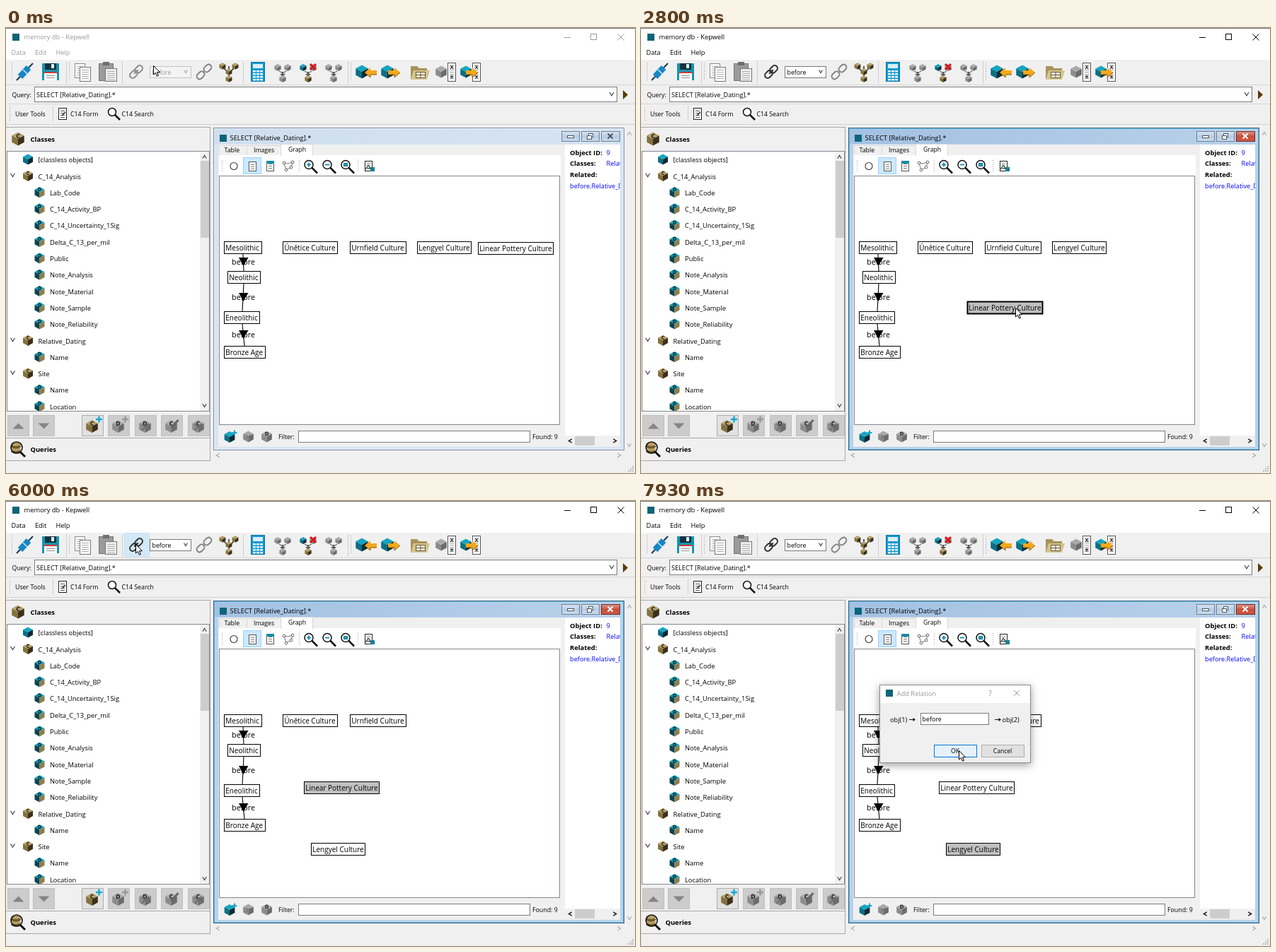
An HTML page with a canvas that plays this animation: 889x630 px, repeating every 8 s.

```html
<!DOCTYPE html>
<html lang="en">
<head>
<meta charset="utf-8">
<title>Relation editor</title>
<style>
html, body { margin: 0; width: 100%; height: 100%; overflow: hidden; background: #f0f0f0; }
canvas { display: block; }
</style>
</head>
<body>
<canvas id="stage" width="889" height="630"></canvas>
<script>
const c = document.getElementById('stage').getContext('2d');
const LOOP = 8000, STEP = 200 / 3, TAU = Math.PI * 2;
const FACE = '#f0f0f0', TEAL = ['#16a5bf', '#0b6f85', '#0a2b36'], TAN = ['#b5a06a', '#85713f', '#3b3018'];
const ATTR = ['#14a0b8', '#0b4450', '#8f7d4c'], GREY = ['#aaa', '#8c8c8c', '#6c6c6c'];

// ---- drawing helpers ----
function text(s, x, y, size = 9.4, col = '#000', bold = false, align = 'left') {
  c.font = (bold ? 'bold ' : '') + size + 'px "Open Sans", "Noto Sans", sans-serif';
  c.textAlign = align;
  c.fillStyle = col;
  c.fillText(s, x, y + size * 0.37);
}
function rect(x, y, w, h, col) { c.fillStyle = col; c.fillRect(x, y, w, h); }
function box(x, y, w, h, fill, edge, lw = 1) {
  rect(x, y, w, h, fill);
  c.strokeStyle = edge; c.lineWidth = lw;
  c.strokeRect(x + 0.5, y + 0.5, w - 1, h - 1);
}
function path(p) {
  c.beginPath();
  for (let i = 0; i < p.length; i += 2) c.lineTo(p[i], p[i + 1]);
}
function poly(p, fill) { path(p); c.fillStyle = fill; c.fill(); }
function line(p, col, w = 1) { path(p); c.strokeStyle = col; c.lineWidth = w; c.stroke(); }
function ring(x, y, r, col, w = 1, fill) {
  c.beginPath(); c.arc(x, y, r, 0, TAU);
  if (fill) { c.fillStyle = fill; c.fill(); }
  c.strokeStyle = col; c.lineWidth = w; c.stroke();
}
function clipped(x, y, w, h, draw) {
  c.save(); c.beginPath(); c.rect(x, y, w, h); c.clip(); draw(); c.restore();
}
function cube(x, y, r, [top, left, right], letter) {
  const w = r * 0.92, h = r / 2;
  poly([x, y - r, x + w, y - h, x, y, x - w, y - h], top);
  poly([x - w, y - h, x, y, x, y + r, x - w, y + h], left);
  poly([x + w, y - h, x, y, x, y + r, x + w, y + h], right);
  if (letter) text(letter, x, y - h, r * 0.95, '#111', true, 'center');
}
function chevron(x, y, dx, dy, col = '#444', w = 1.2) {
  line([x - dx - dy, y - dy + dx, x + dx * 0.6, y + dy * 0.6, x - dx + dy, y - dy - dx], col, w);
}
function handle(x, y, n) { for (let i = 0; i < n; i++) rect(x, y + i * 3, 1, 1, '#9a9a9a'); }
function cross(x, y, r, col, w = 1) {
  line([x - r, y - r, x + r, y + r], col, w);
  line([x - r, y + r, x + r, y - r], col, w);
}
function plus(x, y, r, col, w) {
  line([x - r, y, x + r, y], col, w);
  line([x, y - r, x, y + r], col, w);
}
function page(x, y, w, h, edge, rule, fill = '#fff') {
  box(x, y, w, h, fill, edge);
  for (let j = y + 4; j < y + h - 2; j += 3) line([x + 3, j + 0.5, x + w - 3, j + 0.5], rule);
}
function lens(x, y, r, sign) {
  line([x + r * 0.7, y + r * 0.7, x + r * 2, y + r * 2], '#111', 2.6);
  ring(x, y, r, '#111', 1.5, '#fff');
  if (sign) line([x - 3, y, x + 3, y], '#0a8ea8', 1.8);
  if (sign === '+') line([x, y - 3, x, y + 3], '#0a8ea8', 1.8);
}
function fatArrow(x, y, d, col) {
  poly([x - 9 * d, y - 3, x, y - 3, x, y - 7, x + 8 * d, y, x, y + 7, x, y + 3, x - 9 * d, y + 3], col);
  line([x - 9 * d, y + 3, x, y + 3, x, y + 7, x + 8 * d, y], '#8a5a00');
}
function thinArrow(x, y) {
  line([x, y, x + 8, y], '#111');
  poly([x + 9, y, x + 5.5, y - 2.5, x + 5.5, y + 2.5], '#111');
}
function chain(x, y, col, gap) {
  c.save();
  c.translate(x, y); c.rotate(-Math.PI / 4);
  c.strokeStyle = col; c.lineWidth = 2;
  for (const s of [-1, 1]) {
    c.beginPath(); c.roundRect(s * gap - 6, -4, 12, 8, 4); c.stroke();
  }
  if (gap < 6) line([-4, 0, 4, 0], col, 2);
  c.restore();
}

// ---- toolbars ----
function merge(x, pal, del) {
  cube(x - 7, 56, 5, pal);
  cube(x + 7, 56, 5, del ? GREY : pal);
  line([x - 5, 61, x, 64, x + 5, 61], '#666', 1.2);
  line([x, 62, x, 66], '#555', 2);
  poly([x - 4, 65, x + 4, 65, x, 69], '#555');
  cube(x, 72, 5, del ? TAN : pal);
  if (del) cross(x + 7, 55, 4, '#d81818', 3);
}
function sheet(x) {
  page(x, 49, 12, 27, '#555', '#999');
  text('X', x + 6, 55, 7, '#222', true, 'center');
  text('x', x + 6, 68, 7, '#222', true, 'center');
}
function mainBar(linkable, hover) {
  handle(8, 49, 9);
  line([15, 74, 38, 50], '#123b52', 2);
  line([20, 69, 32, 56], '#1787c4', 9);
  line([24, 59, 30, 65], '#cfeefa', 1.5);

  rect(51, 50, 24, 24, '#1595b0');
  rect(55, 50, 16, 9, '#123440');
  rect(64, 51, 4, 6, '#dff4f8');
  rect(54, 62, 18, 12, '#fff');
  rect(54, 62, 18, 2, '#d33a32');
  for (const y of [67, 70]) rect(57, y, 12, 1, '#888');

  rect(85, 47, 1, 32, '#cfcfcf');
  handle(89, 49, 9);
  page(97, 50, 15, 21, '#8a8a8a', '#b5b5b5');
  page(104, 55, 16, 21, '#777', '#aaa');
  box(131, 50, 21, 25, '#9b9b9b', '#747474');
  rect(137, 48, 9, 5, '#6e6e6e');
  page(140, 57, 17, 19, '#777', '#b0b0b0', '#eee');
  rect(164, 47, 1, 32, '#cfcfcf');

  if (hover) box(167, 45, 36, 34, '#d4e9f7', '#c3dff2');
  chain(184, 62, linkable ? '#333' : '#8d8d8d', 5);
  box(203, 54, 59, 17, linkable ? '#fff' : '#f4f4f4', linkable ? '#7a7a7a' : '#c4c4c4');
  text('before', 206.5, 63, 8.8, linkable ? '#000' : '#999');
  chevron(254, 62, 0, 2.5, linkable ? '#444' : '#aaa');
  chain(280, 62, '#858585', 7);
  for (const s of [-1, 1]) line([280 + s * 5, 62 - s * 9, 280 + s * 7, 62 - s * 12], '#888');

  line([307, 56, 315, 64, 323, 56], '#222', 1.5);
  line([315, 54, 315, 70], '#222', 1.5);
  for (const [x, y] of [[306, 54], [324, 54], [315, 62], [315, 72]]) cube(x, y, 4.8, TAN);
  rect(335, 47, 1, 32, '#cfcfcf');

  box(346, 48, 20, 28, '#1698cf', '#0c739f');
  rect(349, 51, 14, 6, '#d7f2fb');
  for (let i = 0; i < 12; i++) rect(349 + i % 3 * 5, 60 + Math.floor(i / 3) * 4, 4, 2.5, '#eafaff');
  merge(391, GREY);
  merge(427, TEAL, true);
  merge(463, GREY);
  rect(483, 47, 1, 32, '#cfcfcf');
  handle(487, 49, 9);

  cube(503, 62, 9.5, TEAL); fatArrow(515, 63, -1, '#f5a81c');
  cube(539, 62, 9.5, TEAL); fatArrow(549, 63, 1, '#f5a81c');
  poly([572, 54, 581, 54, 584, 57, 595, 57, 595, 73, 572, 73], '#a8935a');
  poly([576, 60, 599, 60, 595, 73, 572, 73], '#d5c48e');
  box(579, 62, 14, 9, '#f6f1de', '#655a35');
  line([586, 62, 586, 71], '#655a35'); line([579, 66.5, 593, 66.5], '#655a35');
  sheet(624); cube(615, 62, 8.5, GREY);
  sheet(659); cube(650, 62, 8.5, TEAL); fatArrow(659, 63, 1, '#f5a81c');
}
function topRows(active, linkable, hover) {
  const ink = active ? '#000' : '#999';
  rect(0, 0, 889, 630, FACE);
  rect(0, 0, 889, 45, '#fff');
  rect(0, 0, 889, 1, '#777');
  rect(9, 8, 10, 10, '#0d6478');
  text('memory db - Kepwell', 25.5, 13, 9.4, ink);
  line([789, 13.5, 798, 13.5], ink);
  c.strokeStyle = ink; c.strokeRect(826.5, 8.5, 8, 8);
  cross(869, 13, 4.5, ink);
  text('Data', 7.5, 34.5, 9.2, ink);
  text('Edit', 41, 34.5, 9.2, ink);
  text('Help', 70.5, 34.5, 9.2, ink);
  mainBar(linkable, hover);
  rect(0, 80, 889, 1, '#d5d5d5');
  text('Query:', 8.5, 94.5, 8.7);
  box(40, 83, 824, 22, '#fff', '#7a7a7a');
  text('SELECT [Relative_Dating].*', 43, 94.5, 9.15);
  chevron(856, 94, 0, 3);
  poly([872, 88, 879, 94.5, 872, 101], '#5b3a08');
  rect(0, 107, 889, 1, '#d5d5d5');
  handle(5, 112, 7);
  text('User Tools', 13, 121.5, 8.8);
  rect(66, 110, 1, 22, '#cfcfcf');
  page(74, 113, 12, 17, '#222', '#555');
  line([79, 124, 84, 119], '#222', 1.5);
  text('C14 Form', 91, 122, 8.75);
  lens(150, 119, 5.5);
  text('C14 Search', 163.5, 122, 8.75);
  rect(0, 136, 889, 1, '#d0d0d0');
}

// ---- left dock ----
const rows = ['[classless objects]', '>C_14_Analysis', 'Lab_Code', 'C_14_Activity_BP', 'C_14_Uncertainty_1Sig',
  'Delta_C_13_per_mil', 'Public', 'Note_Analysis', 'Note_Material', 'Note_Sample', 'Note_Reliability',
  '>Relative_Dating', 'Name', '>Site', 'Name', 'Location'];
function dock() {
  rect(0, 140, 289, 1, '#a8a8a8');
  rect(288, 140, 1, 473, '#a8a8a8');
  cube(17, 157, 9.5, TAN, 'C');
  text('Classes', 34.5, 157.5, 9.5, '#000', true);
  box(1, 174, 287, 369, '#fff', '#828790');
  clipped(2, 175, 272, 367, () => rows.forEach((s, i) => {
    const y = 186.5 + i * 23.3, root = s[0] === '>';
    if (root) chevron(9.5, y - 1, 0, 3);
    if (!i || root) cube(31, y - 0.5, 7.6, i ? TAN : TEAL, i ? 'C' : '');
    else cube(47.5, y - 0.5, 7.6, ATTR, 'D');
    text(root ? s.slice(1) : s, root || !i ? 45.5 : 62, y + 0.3);
  }));
  rect(274, 175, 13, 367, FACE);
  rect(275, 188, 12, 109, '#cdcdcd');
  chevron(280.5, 182, 0, -2.7);
  chevron(280.5, 535, 0, 2.7);
  [2, 38, 107, 144, 182, 219, 257].forEach((x, i) => {
    const on = i === 2, mid = x + 15.5;
    box(x, 548, 31, 30, on ? '#e1e1e1' : '#ccc', on ? '#adadad' : '#bfbfbf');
    if (i < 2) {
      const d = i ? 4 : -4;
      poly([mid - 8, 563.5 - d, mid + 8, 563.5 - d, mid, 563.5 + d], '#858585');
      return;
    }
    cube(mid - 1, 564, 9, on ? TAN : GREY, i < 5 && !on ? 'D' : 'C');
    if (i < 4) plus(mid + 9, 554, 4.5, on ? '#18a8cc' : '#999', 2.5);
    else if (i === 5) line([mid - 1, 566, mid + 9, 555], '#666', 3);
    else cross(mid - 1, 565, 5, '#707070', 2);
  });
  rect(0, 580, 289, 1, '#a8a8a8');
  rect(0, 612, 289, 1, '#a8a8a8');
  for (let i = 3; i >= 0; i--) {
    c.beginPath(); c.ellipse(14, 589 + i * 3.5, 7, 3, 0, 0, TAU);
    c.fillStyle = i % 2 ? '#6f5a2a' : '#b8a068'; c.fill();
  }
  line([20, 600, 27, 607], '#111', 3);
  ring(15, 594, 8, '#111', 1.6);
  text('Queries', 34.5, 596.5, 9.4, '#000', true);
}

// ---- inner window ----
function innerWindow(active) {
  const frame = active ? '#b9d1ea' : '#d7e4f2';
  box(293, 141, 581, 457, frame, active ? '#3f5f7c' : '#7c8c9c');
  const g = c.createLinearGradient(294, 0, 873, 0);
  g.addColorStop(0, active ? '#a3c1e2' : '#cfdeee');
  g.addColorStop(1, frame);
  c.fillStyle = g; c.fillRect(295, 143, 577, 21);
  c.strokeStyle = active ? '#5fbfe4' : '#e9f2fa'; c.strokeRect(294.5, 142.5, 578, 454);
  rect(302, 151, 10, 10, '#0d6478');
  text('SELECT [Relative_Dating].*', 316.5, 156, 9.4);
  [785, 813, 841].forEach((x, i) => {
    const red = active && i === 2, w = i === 2 ? 27 : 26, ink = red ? '#fff' : '#4a5662';
    const b = c.createLinearGradient(0, 146, 0, 161);
    b.addColorStop(0, red ? '#e0a093' : '#dce8f5');
    b.addColorStop(0.5, red ? '#c9503c' : '#b9cde3');
    b.addColorStop(1, red ? '#cf5a45' : '#ccdcee');
    box(x, 146, w, 15, b, red ? '#6d2a25' : '#6f8296');
    if (!i) box(x + 8, 152, 10, 4, '#fff', ink);
    if (i === 1) { box(x + 10, 149, 7, 6, '#fff', ink); box(x + 8, 152, 7, 6, '#fff', ink); }
    if (i === 2) cross(x + 13, 153, 3.5, ink, 2);
  });
  rect(300, 165, 568, 428, FACE);
  box(301, 166, 43, 15, FACE, '#d9d9d9');
  box(340, 166, 49, 15, FACE, '#d9d9d9');
  rect(301, 180, 483, 30, '#fff');
  box(388, 164, 46, 17, '#fff', '#d9d9d9');
  rect(389, 179, 44, 3, '#fff');
  text('Table', 308.5, 173, 8.8);
  text('Images', 350, 173, 8.7);
  text('Graph', 399, 172, 8.7);

  handle(305, 187, 6);
  ring(322, 195.5, 5, '#333', 1.1, '#fff');
  box(335, 183, 26, 24, '#cce8ff', '#99d1ff');
  page(343, 189, 11, 14, '#555', '#777');
  page(368, 188, 11, 15, '#555', '#777');
  rect(368, 188, 11, 4, '#158ca4');
  line([393, 191, 398, 192, 405, 190, 403, 197, 396, 201, 393, 191], '#777');
  for (const [x, y] of [[393, 191], [405, 190], [403, 197], [396, 201]]) ring(x, y, 1.9, '#666', 1, '#fff');
  handle(414, 187, 6);
  lens(428, 193.5, 6, '+');
  lens(454, 193.5, 6, '-');
  lens(480, 193.5, 6);
  box(477, 191, 6, 5, '#1aa0ba', '#0a7890');
  handle(497, 187, 6);
  page(507, 188, 11, 15, '#222', '#888');
  line([508, 200, 512, 194, 515, 199, 509, 198], '#222');
  rect(515, 197, 6, 6, '#167f96');

  box(301, 209, 482, 353, '#fff', '#828790');
  cube(316, 579, 8, TEAL); plus(323, 573, 3.5, '#18a8cc', 2);
  cube(342.5, 578.5, 8, GREY); cross(342.5, 579, 3, '#777', 1.5);
  cube(368.5, 578.5, 8, GREY, 'D');
  text('Filter:', 385, 579, 8.7);
  box(413, 570, 328, 17, '#fff', '#7a7a7a');
  text('Found: 9', 744, 579, 8.8);

  rect(790, 165, 78, 412, '#fff');
  clipped(790, 165, 78, 412, () => {
    text('Object ID:', 797, 176.5, 9.4, '#000', true);
    text('9', 848.5, 176.5, 9.4, '#00f');
    text('Classes:', 797, 192, 9.4, '#000', true);
    text('Relative_Dating', 848.5, 192, 9.2, '#00f');
    text('Related:', 797, 208, 9.4, '#000', true);
    text('before.Relative_Dating', 797, 224, 9.2, '#00f');
  });
  rect(804, 578, 28, 13, '#cdcdcd');
  chevron(797, 584.5, -2.7, 0, '#222', 1.5);
  chevron(861, 584.5, 2.7, 0, '#222', 1.5);

  chevron(881, 149, 0, -2.7, '#aaa');
  chevron(881, 591, 0, 2.7, '#aaa');
  chevron(299, 605, -2.7, 0, '#aaa');
  chevron(867, 605, 2.7, 0, '#aaa');
  for (let i = 0; i < 3; i++)
    for (let j = 0; j <= i; j++) rect(885 - j * 3, 620 + i * 3, 2, 2, '#bbb');
}

// ---- graph ----
function node(s, x, y, w, picked, held) {
  box(x, y, w, 18, picked ? '#c0c0c0' : '#fff', '#000', held ? 2 : 1);
  text(s, x + 2.3, y + 9.5, 10);
}
function graph(s) {
  [[335, 320, 336, 344], [336, 362, 334, 401], [334, 419, 337, 450]].forEach((p, i) => {
    const y = [325, 375, 428][i];
    line(p, '#000', 1.1);
    text('before', 335.5, y + 6.3, 10.7, '#000', false, 'center');
    poly([329, y, 342.5, y, 335.5, y + 12], '#000');
  });
  node('Mesolithic', 308, 302, 54);
  node('Neolithic', 313, 344, 47);
  node('Eneolithic', 308, 401, 51);
  node('Bronze Age', 308, 450, 59);
  node('Únětice Culture', 391, 302, 78);
  node('Urnfield Culture', 486, 302, 80);
  node('Lengyel Culture', ...s.lengyel, 77, s.pick === 2, s.held === 2);
  node('Linear Pottery Culture', ...s.linear, 107, s.pick === 1, s.held === 1);
}

// ---- dialog ----
function dialog(t, hot) {
  const focus = t < 7070, ready = t >= 7130, ink = focus ? '#000' : '#999';
  c.save();
  c.globalAlpha = Math.min(1, (t - 6130) / 284);
  c.shadowColor = 'rgba(0,0,0,.38)'; c.shadowBlur = 11; c.shadowOffsetY = 3;
  rect(337, 260, 214, 111, FACE);
  c.shadowColor = 'transparent';
  box(337, 260, 214, 111, FACE, '#8c8c8c');
  rect(338, 261, 212, 25, '#fff');
  rect(346, 267, 10, 10, '#0d6478');
  text('Add Relation', 361.5, 272.5, 9.4, ink);
  text('?', 493.5, 272, 10.5, ink, false, 'center');
  cross(531, 272, 4, ink);
  text('obj(1)', 352, 309.5, 9.2);
  thinArrow(379, 309.5);
  box(395, 300, ready ? 97 : 122, 17, '#fff', focus ? '#0078d7' : '#7a7a7a');
  text('before', 397.5, 309, 8.9);
  if (focus && t < 6740) rect(426, 303, 1, 11, '#000');
  thinArrow(ready ? 500 : 524, 309.5);
  if (ready) text('obj(2)', 510.5, 309.5, 9.2);
  box(414, 345, 61, 18, hot ? '#e5f1fb' : ready ? '#e1e1e1' : '#ccc', hot ? '#0078d7' : ready ? '#adadad' : '#bfbfbf');
  text('OK', 444, 354, 8.7, ready ? '#000' : '#838383', false, 'center');
  box(481, 345, 61, 18, '#e1e1e1', '#adadad');
  text('Cancel', 511, 354, 8.6, '#000', false, 'center');
  c.restore();
}

// ---- motion ----
const track = [
  [0, 208, 53], [470, 827, 260], [730, 690, 370], [800, 690, 370], [1200, 572, 350], [1600, 686, 318],
  [1800, 686, 318], [1930, 595, 376], [2000, 501, 396], [2130, 501, 396], [2400, 603, 393], [2600, 550, 390],
  [2730, 550, 390], [2930, 489, 406], [3000, 489, 406], [3330, 640, 309], [3400, 640, 309],
  [3600, 634, 318], [4270, 491, 491], [4330, 491, 489], [4470, 488, 406], [5270, 488, 406],
  [6000, 183, 61], [6130, 183, 61], [6400, 389, 236], [7000, 476, 488], [7470, 476, 489], [7930, 449, 353]
];
function pointer(t) {
  const i = track.findIndex(k => k[0] > t);
  if (i < 0) return track[track.length - 1].slice(1);
  const [t0, x0, y0] = track[i - 1], [t1, x1, y1] = track[i];
  const u = (t - t0) / (t1 - t0);
  return [Math.round(x0 + (x1 - x0) * u), Math.round(y0 + (y1 - y0) * u)];
}
function dragged(t, from, to, rest, end) {
  if (t < from) return rest;
  if (t >= to) return end;
  const a = pointer(from), b = pointer(t);
  return [rest[0] + b[0] - a[0], rest[1] + b[1] - a[1]];
}
function stateAt(t) {
  const mid = [482, 381], first = t < 2730;
  return {
    linear: first ? dragged(t, 1800, 2000, [667, 303], mid) : dragged(t, 2730, 2930, mid, [421, 397]),
    lengyel: dragged(t, 3400, 4270, [581, 302], [431, 484]),
    pick: t < 1800 ? 0 : t < 3470 ? 1 : t < 4730 ? 2 : t < 7070 ? 1 : 2,
    held: t >= 1800 && t < 2200 || t >= 2800 && t < 3070 ? 1 : t >= 3470 && t < 4330 ? 2 : 0
  };
}
function cursor(x, y) {
  path([x + 0.5, y + 0.5, x + 0.5, y + 13, x + 3.3, y + 10.4, x + 5.4, y + 15.2, x + 7.4, y + 14.3,
    x + 5.4, y + 9.7, x + 9.5, y + 9.7]);
  c.closePath();
  c.fillStyle = '#fff'; c.fill();
  c.strokeStyle = '#000'; c.lineWidth = 1; c.stroke();
}
function draw(t) {
  const [x, y] = pointer(t);
  const active = t >= 1800 && t < 6130 || t >= 7070;
  const overLink = t > 5330 && t < 6200 && x >= 167 && x < 203 && y < 79;
  topRows(active, t >= 1800, overLink);
  dock();
  innerWindow(t >= 1800);
  graph(stateAt(t));
  if (t >= 6200) dialog(t, t > 7500 && y < 363);
  cursor(x, y);
}

const start = performance.now();
let shown = -1;
function tick() {
  const now = Math.max(0, performance.now() - start) % LOOP;
  const k = Math.floor((now + 3.4) / STEP) % 120;
  if (k !== shown) draw(Math.round(k * STEP / 10) * 10);
  shown = k;
  requestAnimationFrame(tick);
}
tick();
</script>
</body>
</html>
```
